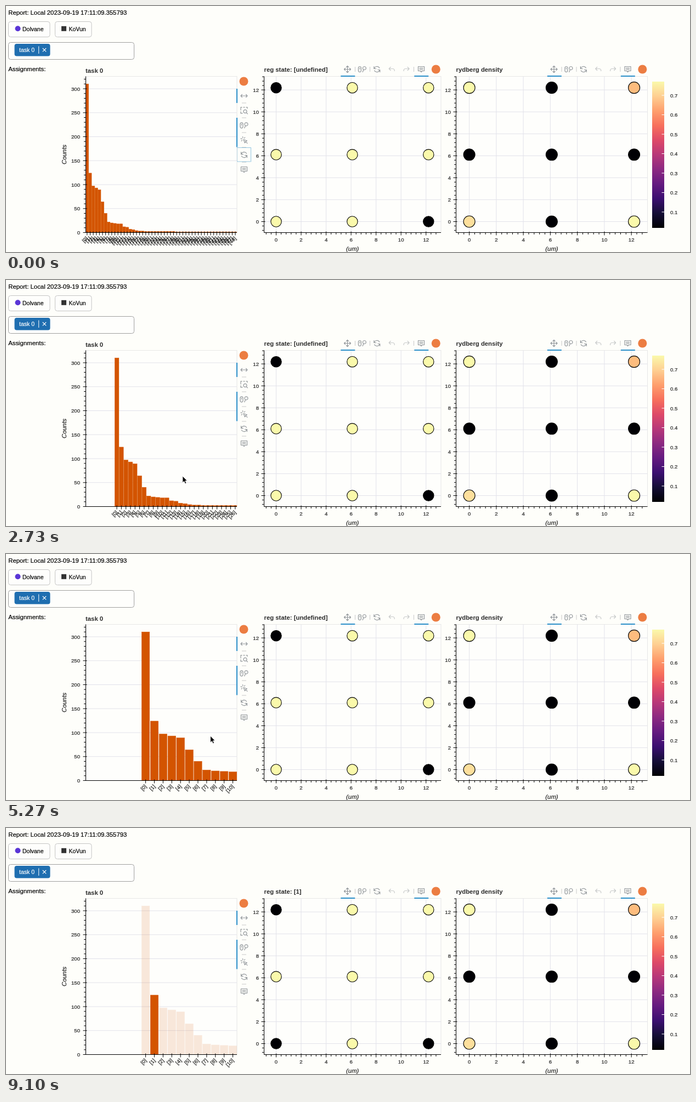
Write an HTML page that moves like this. It is 1247 px wide and 449 px high and loops after 9.53 s.

```html
<!DOCTYPE html>
<html lang="en">
<head>
<meta charset="utf-8">
<title>Task report</title>
<style>
  html, body { margin: 0; width: 100%; height: 100%; overflow: hidden; background: #fefefa; }
  svg { display: block; width: 1247px; height: 449px; }
  text {
    font-family: "Liberation Sans", Arial, Helvetica, sans-serif; font-size: 11.35px;
    fill: #000; stroke: #000; stroke-width: .2px;
  }
  .small { font-size: 9.6px; fill: #222; stroke: #222; }
  .title { font-weight: bold; fill: #2c2c2c; stroke: none; }
  .axis { font-style: italic; fill: #222; stroke: #222; }
  .btn { font-size: 10.5px; }
  .tag { fill: #fff; stroke: #fff; }
  .icon { fill: none; stroke: #93989c; stroke-width: 1.2; stroke-linecap: round; stroke-linejoin: round; }
  .off { opacity: .5; }
</style>
</head>
<body>
<svg id="stage" viewBox="0 0 1247 449">
  <defs>
    <clipPath id="frame"><rect x="145" y="128" width="276" height="286"/></clipPath>
    <linearGradient id="ramp" x1="0" y1="1" x2="0" y2="0"></linearGradient>
  </defs>
</svg>
<script>
const NS = "http://www.w3.org/2000/svg";
const stage = document.getElementById("stage");
const LOOP = 9530;
const COUNT = 49;
const BLUE = "#2b8fc9";
const PALE = "#faf9ab";
const ORANGE = "#d35400";
const TOP = 128.5, BOTTOM = 413.5, LEFT = 145, RIGHT = 421;

function add(tag, attrs, parent = stage) {
  const el = document.createElementNS(NS, tag);
  for (const k in attrs) el.setAttribute(k, attrs[k]);
  parent.appendChild(el);
  return el;
}
function label(str, x, y, cls = "", anchor = "start", parent = stage) {
  const el = add("text", { x, y, class: cls, "text-anchor": anchor }, parent);
  el.textContent = str;
  return el;
}
function line(x1, y1, x2, y2, stroke = "#000", width = 1, parent = stage) {
  return add("line", { x1, y1, x2, y2, stroke, "stroke-width": width }, parent);
}
function box(x, y, width, height, attrs, parent = stage) {
  return add("rect", { x, y, width, height, ...attrs }, parent);
}

// Header
label("Report: Local 2023-09-19 17:11:09.355793", 4.2, 15.5);
const outline = { rx: 4, fill: "#fefefc", stroke: "#c4c4c4", "stroke-width": 1 };
box(4.5, 28.5, 75.5, 28, outline);
box(89.5, 28.5, 66.5, 28, outline);
add("circle", { cx: 21.5, cy: 41.3, r: 5, fill: "#5a35d6" });
box(101, 36.8, 9, 9, { fill: "#333" });
label("Dolvane", 30, 45.8, "btn");
label("KoVun", 114.5, 45.8, "btn");
box(4.5, 66.5, 229, 31, { ...outline, stroke: "#a0a0a0" });
box(15.5, 69, 65, 22.5, { rx: 4, fill: "#1f6eb0" });
label("task 0", 24, 83.8, "btn tag");
line(59.7, 73.5, 59.7, 87, "#fff");
add("path", { d: "M66.8 77l6.4 6.4m0-6.4l-6.4 6.4", stroke: "#fff", "stroke-width": 1.1 });
label("Assignments:", 4.2, 118.5);

// Tool icons, centred on 0,0
const lens = (x, y, r) => `M${x - r} ${y}a${r} ${r} 0 1 1 ${2 * r} 0a${r} ${r} 0 1 1 ${-2 * r} 0`;
const ICONS = {
  pan: "M-6 0H6M0-6V6M-4-2l-2 2 2 2M4-2l2 2-2 2M-2-4l2-2 2 2M-2 4l2 2 2-2",
  wide: "M-6 0H6M-3.5-2.5L-6 0l2.5 2.5M3.5-2.5L6 0 3.5 2.5",
  wheel: "M-7-2.5a2.5 2.5 0 0 1 5 0v5a2.5 2.5 0 0 1-5 0zM-4.5-2.5v2" + lens(4, -2, 3) + "M2.4 1L.8 5",
  zoom: "M-3 5h-3V2M-6-1v-2M-6-4v-2h2M-1-6h2M4-6h2v2" + lens(2, 1.5, 3) + "M4.2 3.8L6.5 6",
  reset: "M-5-1a5.2 5.2 0 0 1 9.6-1.4M5 1a5.2 5.2 0 0 1-9.6 1.4M-5.4-5v4h3.8M5.4 5V1H1.6",
  undo: "M-2-4l-3 3 3 3M-5-1h7a3 3 0 0 1 3 3v1",
  redo: "M2-4l3 3-3 3M5-1h-7a3 3 0 0 0-3 3v1",
  tap: "M-1-1l6.5 2.3-2.8 1.2-1.2 2.8zM-2.5-6l.5 2.2M-6-2.5l2.2.5M-4.8 1.6l1.4-1.2M1.6-4.8L.6-3.4M3 3l3 3",
  hover: "M-5.5-5h11v8H1.8L0 5-1.8 3h-3.7zM-3-2.2h6M-3 .3h6"
};
function icon(name, x, y, off) {
  add("path", { d: ICONS[name], class: off ? "icon off" : "icon", transform: `translate(${x} ${y})` });
}
const badge = (cx, cy) => add("circle", { cx, cy, r: 8, fill: "#ec7d42" });

badge(433.5, 137.5);
["wide", "zoom", "wheel", "tap", "reset", "hover"].forEach((n, i) => icon(n, 434, 164 + i * 26.9));
for (const y of [177, 204, 231, 258, 285]) line(430, y, 438, y, "#c9c9c9");
const focus = box(421.5, 258.5, 25, 25.5, {
  fill: "none", stroke: BLUE, "stroke-width": 1, "stroke-dasharray": "1 1"
});

function toolbar(x) {
  ["pan", "wheel", "reset", "undo", "redo", "hover"].forEach((n, i) =>
    icon(n, x + i * 26.9, 115.5, n === "undo" || n === "redo"));
  for (const d of [14, 41, 121]) line(x + d, 111, x + d, 120, "#c9c9c9");
  line(x - 12.2, 128, x + 13.8, 128, BLUE, 2);
  line(x + 121.8, 128, x + 147.8, 128, BLUE, 2);
  badge(x + 161.3, 115.5);
}

// Axis with major and minor ticks along the left side
function leftAxis(x, zero, unit, major, minor, end) {
  line(x, TOP, x, BOTTOM);
  const first = Math.ceil((zero - BOTTOM) / (unit * minor) - 0.01);
  const last = Math.floor((zero - TOP) / (unit * minor));
  const per = Math.round(major / minor);
  for (let i = first; i <= last; i++) {
    const y = zero - i * minor * unit;
    if (i % per) line(x - 3.5, y, x, y);
    else {
      line(x - 5, y, x + 2, y);
      label(i * minor, end, y + 3.5, "small", "end");
    }
  }
}
const grid = (x1, y1, x2, y2) => line(x1, y1, x2, y2, "#e2e2ea");
const border = (x, right) => box(x, TOP, right - x, BOTTOM - TOP, {
  fill: "#fefefc", stroke: "#e5e5e5", "stroke-width": 0.9
});

// Histogram
const COUNTS = [310, 124, 97, 93, 89, 64, 40, 22, 20, 19, 18, 18, 12, 11, 7, 6, 4, 3, 3];
const countOf = i => COUNTS[i] ?? (i < 29 ? 2 : 1);
const PER = 0.875;

border(LEFT, RIGHT);
for (let v = 0; v <= 300; v += 50) grid(LEFT, BOTTOM - v * PER, RIGHT, BOTTOM - v * PER);
line(421, 151, 421, 177, BLUE, 2);
line(421, 204, 421, 257.5, BLUE, 2);
const barLayer = add("g", { "clip-path": "url(#frame)" });
leftAxis(LEFT + 0.5, BOTTOM, PER, 50, 10, 135);
line(LEFT, BOTTOM, RIGHT, BOTTOM);
label("task 0", LEFT, 122, "title");
label("Counts", 0, 0, "axis", "middle").setAttribute("transform", "translate(110 271) rotate(-90)");

// The thin outline closes the gaps between narrow bars
const bars = Array.from({ length: COUNT }, (_, i) => {
  const h = countOf(i) * PER;
  const rect = box(0, BOTTOM - h, 1, h, { fill: ORANGE, stroke: ORANGE, "stroke-width": 0.6 }, barLayer);
  const mark = add("g", {});
  line(0, BOTTOM - 2, 0, BOTTOM + 5, "#000", 1, mark);
  label(`[${i}]`, 0, 3.4, "small", "end", mark).setAttribute("transform", "translate(0 422.5) rotate(-45)");
  return { rect, mark };
});

// Atom maps
function atomMap(x, right, zeroX, unit, r, title, colours) {
  const zeroY = 393.5, unitY = 20.03;
  border(x, right);
  for (let v = 0; v <= 12; v += 2) {
    grid(x, zeroY - v * unitY, right, zeroY - v * unitY);
    grid(zeroX + v * unit, TOP, zeroX + v * unit, BOTTOM);
  }
  leftAxis(x, zeroY, unitY, 2, 0.4, x - 9.5);
  line(x, BOTTOM, right, BOTTOM);
  for (let i = -2; i <= 33; i++) {
    const px = zeroX + i * 0.4 * unit;
    if (px < x || px > right) continue;
    if (i % 5) line(px, BOTTOM, px, BOTTOM + 3.5);
    else {
      line(px, BOTTOM - 2, px, BOTTOM + 5);
      label(i * 0.4, px, 430.3, "small", "middle");
    }
  }
  label("(um)", (x + right) / 2, 447.3, "axis", "middle");
  const heading = label(title, x, 119.5, "title");
  const atoms = colours.map((fill, i) => add("circle", {
    cx: zeroX + (i % 3) * 6.1 * unit,
    cy: zeroY - (2 - Math.floor(i / 3)) * 6.1 * unitY,
    r, fill, stroke: "#000", "stroke-width": 1.1
  }));
  return { heading, atoms };
}
const K = "#000004";
const state = atomMap(470.5, 793, 492.5, 22.77, 9.7, "reg state: [undefined]",
  [K, PALE, PALE, PALE, PALE, PALE, PALE, PALE, K]);
atomMap(820.5, 1169.5, 844.6, 24.63, 10.5, "rydberg density",
  [PALE, K, "#fdbc7e", K, K, K, "#fddf9c", K, PALE]);
toolbar(622.5);
toolbar(999);

// Colour bar
const RAMP = ["#000004", "#140e36", "#3b0f70", "#641a80", "#8c2981", "#b73779",
  "#de4968", "#f7705c", "#fe9f6d", "#fecf92", PALE];
RAMP.forEach((c, i) => add("stop", { offset: i / 10, "stop-color": c }, document.getElementById("ramp")));
box(1178, 138, 22, 267, { fill: "url(#ramp)" });
for (let i = 1; i <= 7; i++) {
  const y = 411.5 - i * 35.5;
  line(1195.5, y, 1200, y, "#fff");
  label((i / 10).toFixed(1), 1211, y + 3.5, "small");
}

const cursor = add("path", {
  d: "M0 0V12.2L2.8 9.6 4.7 14 6.9 13 5 8.8H8.6Z",
  fill: "#000", stroke: "#fff", "stroke-width": 0.9, "stroke-linejoin": "round"
});

// time, left edge of bar 0, bar pitch, pointer x, pointer y
const KEYS = [
  [0, 145, 5.63, 200, 470],
  [970, 145, 5.63, 200, 470],
  [1400, 145, 5.63, 229.5, 357],
  [1950, 105.5, 8.3, 229.5, 357],
  [2250, 105.5, 8.3, 229.5, 357],
  [2900, 216.5, 8.3, 340.5, 358],
  [3150, 216.5, 8.3, 340.5, 358],
  [3270, 202.3, 9.17, 340.5, 358],
  [3850, 118.2, 14.7, 340.5, 358],
  [4030, 118.2, 14.7, 340.5, 358],
  [4200, 100, 15.9, 340.5, 358],
  [4500, 100, 15.9, 226, 340],
  [5100, 246.6, 15.9, 372.6, 332],
  [5450, 246.6, 15.9, 372.6, 332],
  [6200, 246.6, 15.9, 269, 326],
  [7980, 246.6, 15.9, 269, 326],
  [8850, 246.6, 15.9, 300, -20],
  [LOOP, 246.6, 15.9, 300, -20]
];
const PRESS = 2250, PICK = 6800;

function pose(t) {
  const n = KEYS.findIndex(k => k[0] > t);
  const a = KEYS[n - 1], b = KEYS[n];
  const u = (t - a[0]) / (b[0] - a[0]);
  const e = u * u * (3 - 2 * u);
  return a.slice(1).map((v, i) => v + (b[i + 1] - v) * e);
}

function render(t) {
  const [start, pitch, px, py] = pose(t);
  const picked = t >= PICK;
  bars.forEach(({ rect, mark }, i) => {
    const x = start + i * pitch, mid = x + pitch / 2;
    rect.setAttribute("x", x + pitch * 0.05);
    rect.setAttribute("width", pitch * 0.9);
    rect.setAttribute("opacity", picked && i !== 1 ? 0.13 : 1);
    mark.setAttribute("transform", `translate(${mid} 0)`);
    mark.setAttribute("visibility", mid >= LEFT && mid <= RIGHT ? "visible" : "hidden");
  });
  focus.setAttribute("visibility", t < PRESS ? "visible" : "hidden");
  state.heading.textContent = picked ? "reg state: [1]" : "reg state: [undefined]";
  state.atoms[6].setAttribute("fill", picked ? K : PALE);
  cursor.setAttribute("transform", `translate(${px} ${py})`);
}

const begin = performance.now();
function tick() {
  render((performance.now() - begin) % LOOP);
  requestAnimationFrame(tick);
}
tick();
</script>
</body>
</html>
```
